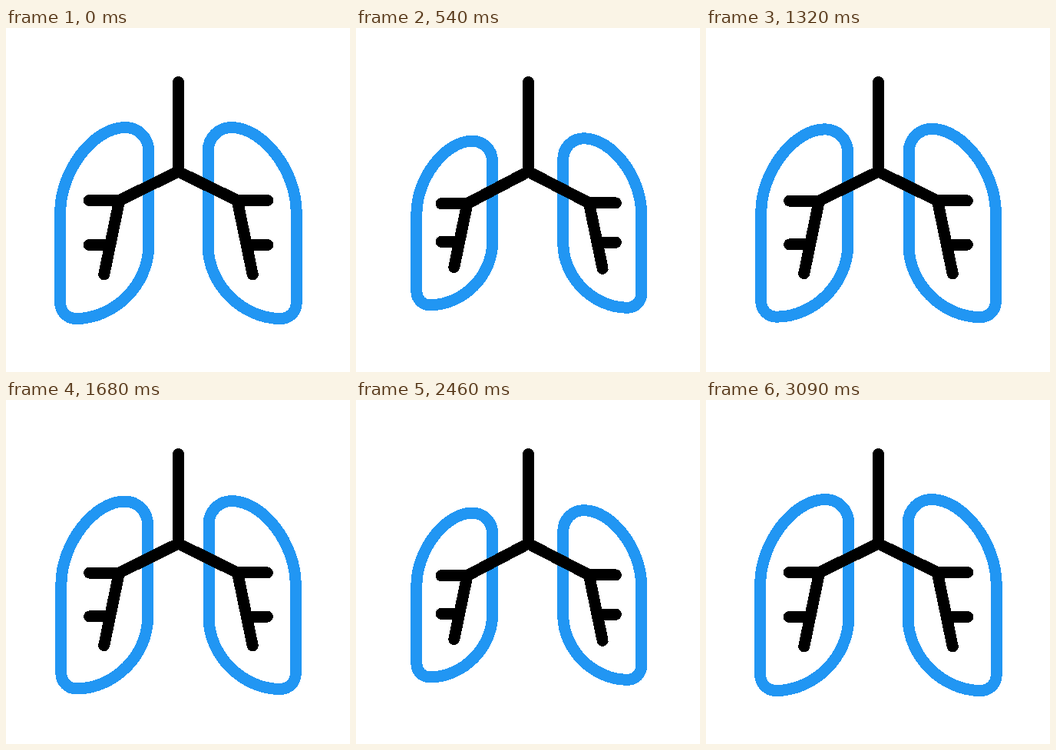
An HTML page for the animation above (3600 ms loop, 448 by 448 pixels).

```html
<!DOCTYPE html>
<html lang="en">
<head>
<meta charset="utf-8">
<title>Breathing lungs</title>
<style>
  html, body { margin: 0; width: 100%; height: 100%; overflow: hidden; background: #fff; }
  svg { display: block; width: 100vw; height: 100vh; shape-rendering: crispEdges; }
  path { fill: none; stroke: #000; stroke-width: 15; stroke-linecap: round; stroke-linejoin: round; vector-effect: non-scaling-stroke; }
  .lung { stroke: #2196f3; }
</style>
</head>
<body>
<svg viewBox="0 0 448 448">
  <defs>
    <path id="lung" class="lung" d="M-57.5 -14C-57.5 -68 -14 -124.5 27 -124.5C44 -124.5 57.5 -111 57.5 -94V30C57.5 80 13 124.5 -37 124.5C-48.5 124.5 -57.5 115.5 -57.5 104Z"/>
    <path id="bronchi" d="M-20 -29.5H19.5L-.5 67M-20 28.5H7"/>
  </defs>
  <use class="left" href="#lung"/>
  <use class="right" href="#lung"/>
  <use class="left" href="#bronchi"/>
  <use class="right" href="#bronchi"/>
  <path id="trachea"/>
</svg>
<script>
  const LOOP = 3600, STEP = 30;
  // Turning points in ms: full, drawn in, full, drawn in, full
  const TURNS = [0, 690, 1500, 2280, 3090];
  const FORK = { x: 224.4, y: 187 };
  const ELBOW = { x: 19.5, y: -29.5 };
  const SIDES = [
    { name: 'left', x: 128.2, y: 254, flip: 1, shrink: 0.16 },
    { name: 'right', x: 320.7, y: 254, flip: -1, shrink: 0.129 }
  ];
  const trachea = document.getElementById('trachea');
  for (const side of SIDES) side.parts = document.querySelectorAll('.' + side.name);

  // 0 is full, 1 is drawn in, with a sine ease between turning points
  function depthAt(time) {
    const i = TURNS.findIndex(turn => turn > time);
    if (i < 0) return 0;
    const part = (time - TURNS[i - 1]) / (TURNS[i] - TURNS[i - 1]);
    return (1 - Math.cos(Math.PI * (i - 1 + part))) / 2;
  }

  function draw(time) {
    const depth = depthAt(Math.floor(time % LOOP / STEP) * STEP);
    const elbows = SIDES.map(({ x, y, flip, shrink, parts }) => {
      const k = 1 - shrink * depth;
      for (const part of parts) {
        part.setAttribute('transform', `translate(${x} ${y}) scale(${flip * k} ${k})`);
      }
      return `${x + flip * k * ELBOW.x} ${y + k * ELBOW.y}`;
    });
    trachea.setAttribute('d', `M${FORK.x} 70.5V${FORK.y}M${elbows[0]}L${FORK.x} ${FORK.y}L${elbows[1]}`);
  }

  const start = performance.now();
  function tick() {
    draw(performance.now() - start);
    requestAnimationFrame(tick);
  }
  tick();
</script>
</body>
</html>
```
